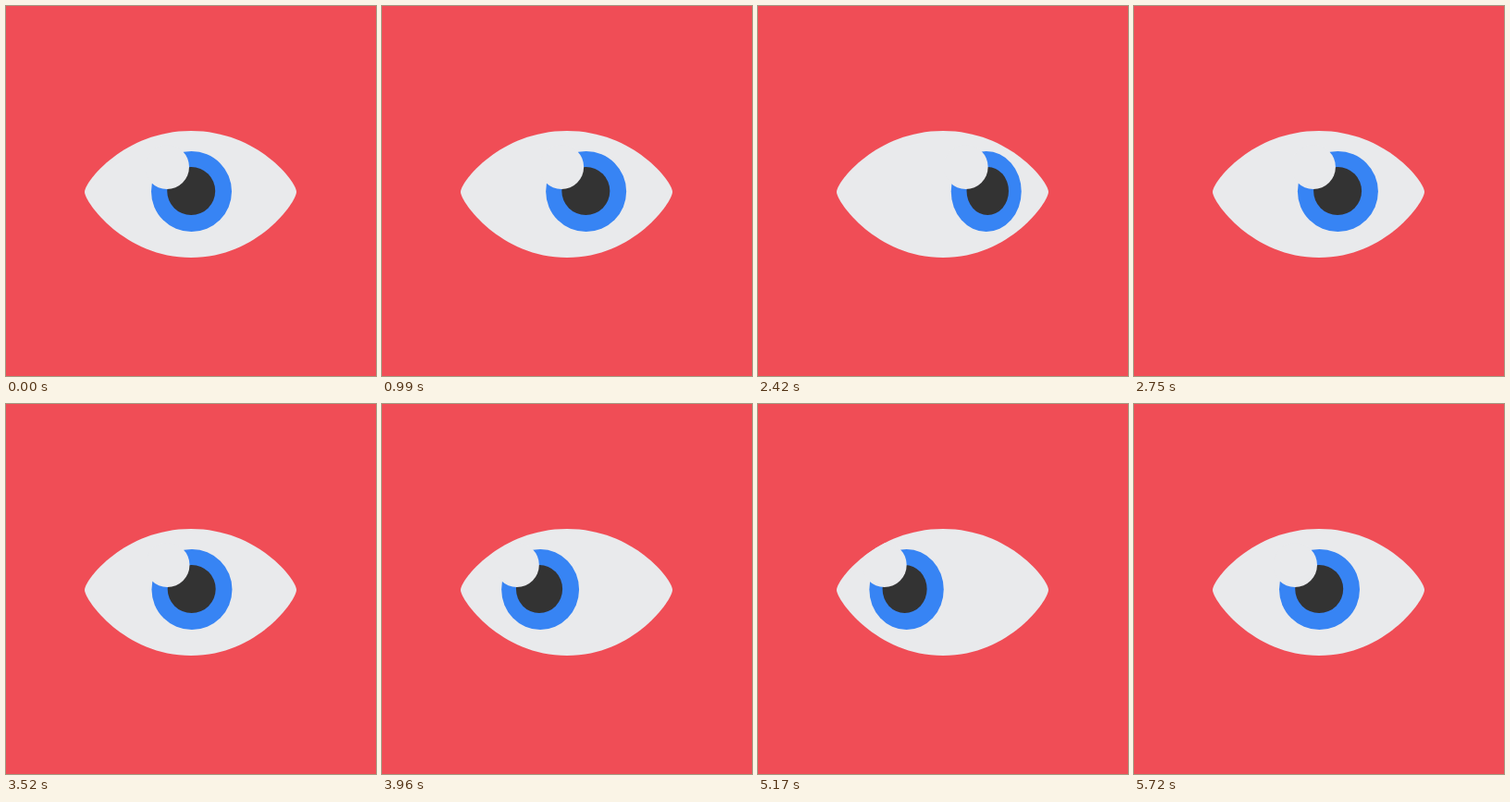
An HTML page for the animation above (6380 ms loop, 400 by 400 pixels).

```html
<!DOCTYPE html>
<html lang="en">
<head>
<meta charset="utf-8">
<title>Looking eye</title>
<style>
  html, body { margin: 0; width: 100%; height: 100%; overflow: hidden; background: #f04d56; }
  svg { display: block; width: 100%; height: 100%; }
</style>
</head>
<body>
<svg viewBox="0 0 400 400">
  <clipPath id="lids">
    <path id="eye" d="M85 201C85 190 128 135 200 135S314 190 314 201S272 272 200 272S85 212 85 201Z"/>
  </clipPath>
  <use href="#eye" fill="#e9eaec"/>
  <g clip-path="url(#lids)">
    <ellipse id="iris" cy="200.5" ry="43.5" fill="#3784f4"/>
    <ellipse id="pupil" cy="200" ry="26" fill="#333"/>
    <circle id="glint" cy="174" r="24" fill="#e9eaec"/>
  </g>
</svg>
<script>
const LOOP = 6380, STEP = 110;
const [iris, pupil, glint] = ['iris', 'pupil', 'glint'].map(id => document.getElementById(id));

// start, end, from, to, ease-in bias
const moves = [
  [480, 1345, 0, 51, 1.6],
  [2259, 3105, 51, 0.8, 1],
  [3480, 4320, 0.8, -49, 1],
  [4960, 5725, -49, 0, 1]
];

const smooth = p => {
  p = Math.min(1, Math.max(0, p));
  return p * p * (3 - 2 * p);
};

function gaze(t) {
  let x = 0;
  for (const [start, end, from, to, bias] of moves) {
    if (t < start) break;
    x = from + (to - from) * smooth(((t - start) / (end - start)) ** bias);
  }
  return x;
}

function draw(t) {
  const x = gaze(t);
  // the iris narrows as it turns towards a corner
  const turn = x > 0 ? smooth((x - 24) / 27) : smooth((-x - 15) / 34);
  const loss = turn * (x > 0 ? 12 : 8);
  const narrow = 1 - loss / 87;
  iris.setAttribute('cx', 200.5 + x);
  iris.setAttribute('rx', 43.5 * narrow);
  pupil.setAttribute('cx', 200.2 + x + Math.sign(x) * turn * 2);
  pupil.setAttribute('rx', 26 * narrow);
  glint.setAttribute('cx', 174 + x + loss * 0.4);
}

const begin = performance.now();
function tick() {
  const t = (performance.now() - begin) % LOOP;
  draw(Math.floor(t / STEP) * STEP);
  requestAnimationFrame(tick);
}
tick();
</script>
</body>
</html>
```
